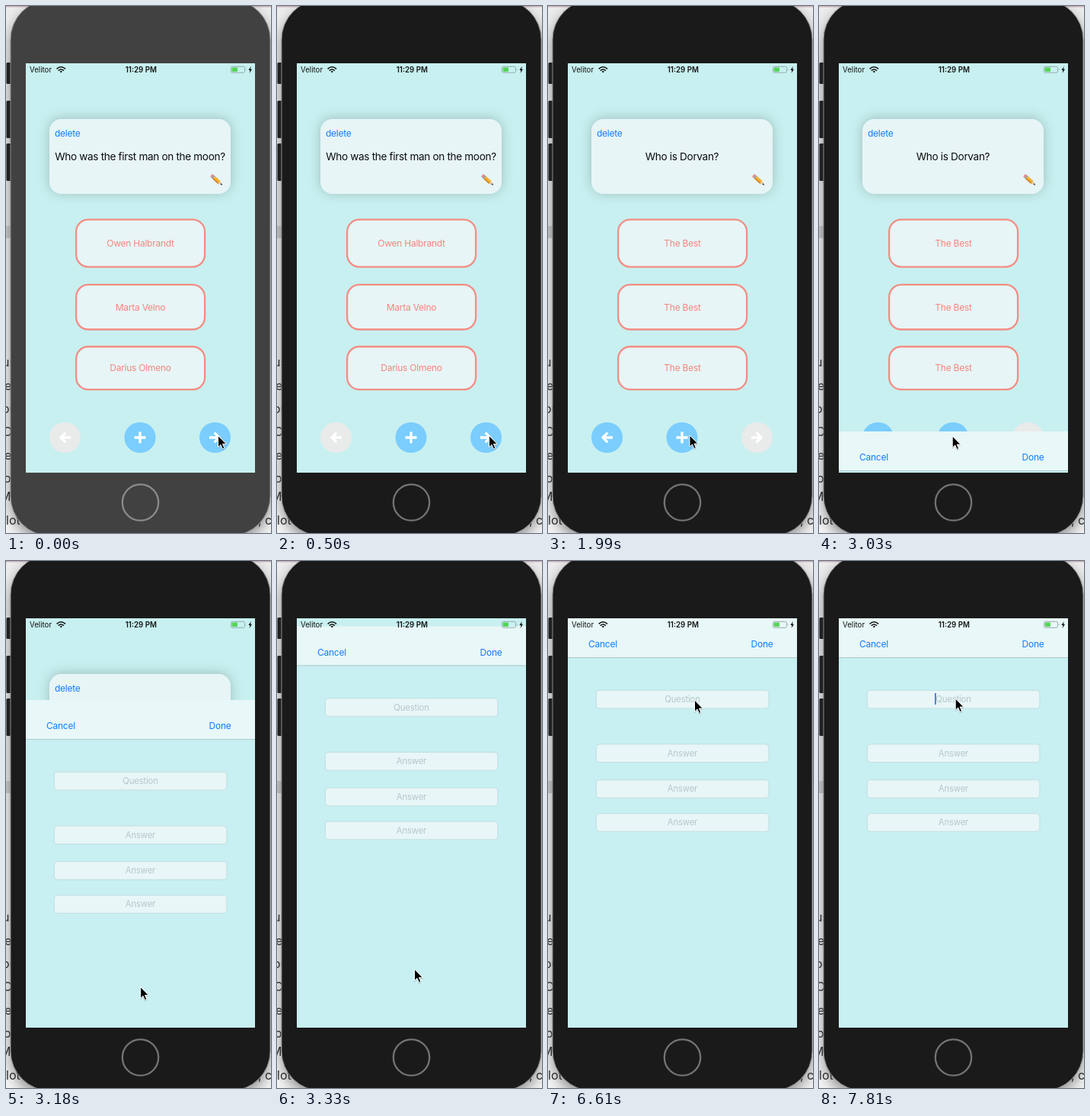
These frames come from a looping animation (348 px wide and 690 px high, 8 s). An HTML page:

```html
<!DOCTYPE html>
<html lang="en">
<head>
<meta charset="utf-8">
<title>Quiz cards</title>
<style>
  html, body { margin: 0; width: 100%; height: 100%; overflow: hidden; background: #ededed; }
  svg { display: block; width: 348px; height: 690px; }
  text { font-family: Inter, "Liberation Sans", sans-serif; letter-spacing: -.02em; font-size: 12px; }
  .mid { text-anchor: middle; }
  .link { fill: #107cff; }
  .answer { fill: #f4867c; }
  .question { font-size: 13.6px; letter-spacing: -.025em; fill: #0c0c0c; }
  .hint { font-size: 11.3px; letter-spacing: -.015em; fill: #b5c7ca; }
  .page { font-size: 16px; letter-spacing: 0; fill: #2b2b2b; }
  .status { font-size: 9.7px; letter-spacing: 0; fill: #111; }
  .glyph { fill: none; stroke: #fff; stroke-width: 3.3; }
</style>
</head>
<body>
<svg viewBox="0 0 348 690">
  <defs>
    <clipPath id="screenClip"><rect x="26" y="75" width="301" height="536"/></clipPath>
    <filter id="cardShadow" x="-20%" y="-40%" width="140%" height="180%">
      <feDropShadow dx="0" dy="-1" stdDeviation="8" flood-color="#001a1a" flood-opacity=".22"/>
    </filter>
    <filter id="phoneShadow" x="-20%" y="-10%" width="140%" height="120%">
      <feGaussianBlur stdDeviation="9"/>
    </filter>
    <filter id="cursorShadow" x="-50%" y="-50%" width="200%" height="200%">
      <feDropShadow dx="0" dy=".8" stdDeviation=".7" flood-opacity=".35"/>
    </filter>
  </defs>

  <rect width="348" height="690" fill="#f4f4f4"/>
  <rect width="348" height="288" fill="#ececec"/>
  <rect width="348" height="1.5" fill="#cbb4b8"/>
  <rect y="288" width="8" height="16" fill="#cfcfcf"/>
  <rect x="6" y="0" width="341" height="701" rx="52" opacity=".42" filter="url(#phoneShadow)"/>
  <g id="pageText"></g>
  <g fill="#202020">
    <rect x=".5" y="74" width="7" height="28" rx="1.5"/>
    <rect x=".5" y="124" width="7" height="49" rx="1.5"/>
    <rect x=".5" y="180" width="7" height="49" rx="1.5"/>
  </g>
  <rect id="body" x="6" y="-8" width="341" height="701.5" rx="52" stroke="#8b8b8b" stroke-width="1"/>
  <circle id="home" cx="176.5" cy="650" r="23.7" fill="none" stroke-width="2.3"/>

  <g clip-path="url(#screenClip)">
    <rect x="26" y="75" width="301" height="536" fill="#c8f0f0"/>
    <g id="card">
      <rect x="57" y="148" width="238" height="98" rx="16" fill="#e7f5f7" filter="url(#cardShadow)"/>
      <text class="link" x="64" y="171">delete</text>
      <text class="question mid" id="question" x="176" y="202"></text>
      <g transform="translate(269.5 221.5) rotate(42)">
        <rect x="0" y="-2.4" width="3" height="4.8" rx="1.3" fill="#e58c91"/>
        <rect x="2.5" y="-2.4" width="2.2" height="4.8" fill="#9a9fa3"/>
        <rect x="4.7" y="-2.4" width="9.3" height="4.8" fill="#f4b334"/>
        <rect x="4.7" y=".9" width="9.3" height="1.5" fill="#cf7f22"/>
        <path d="M14-2.4 19.5 0 14 2.4Z" fill="#e8c9a0"/>
        <path d="M17-1.1 19.8 0 17 1.1Z" fill="#333"/>
      </g>
    </g>
    <g id="answers"></g>
    <g id="buttons"></g>
    <g id="modal">
      <rect x="26" width="301" height="545" fill="#c8eff1"/>
      <rect x="26" width="301" height="51" fill="#e8f7f7"/>
      <rect x="26" y="51" width="301" height="1" fill="#b0c9ca"/>
      <text class="link" x="53" y="38.4">Cancel</text>
      <text class="link" x="295.5" y="38.4" text-anchor="end">Done</text>
      <g id="fields"></g>
      <rect id="caret" x="152" y="98" width="1.7" height="15" fill="#4169f0"/>
    </g>
    <text class="status" x="31" y="86.7">Velitor</text>
    <g fill="none" stroke="#111" stroke-width="1.6">
      <path d="M66.6 82.3Q72.3 77.2 78 82.3M68.7 84.6Q72.3 81.4 75.9 84.6"/>
      <path d="M70.5 85.6Q72.3 84.2 74.1 85.6L72.3 87.6Z" fill="#111" stroke="none"/>
    </g>
    <text class="status mid" x="177.3" y="86.7" font-weight="600">11:29 PM</text>
    <rect x="295.5" y="79.3" width="18" height="8" rx="2" fill="none" stroke="#8fa5a5" stroke-width=".9"/>
    <rect x="296.7" y="80.5" width="7.3" height="5.6" rx=".8" fill="#55d558"/>
    <path d="M314.8 81.8q1.4 1.5 0 3Z" fill="#8fa5a5"/>
    <path d="M321.8 79 318.4 84H320.4L319.6 88 323 82.7H321Z" fill="#111"/>
  </g>

  <path id="cursor" d="M0 0V15.2L3.5 12 5.9 17.5 8.4 16.4 6 11.1H10.8Z" stroke="#fff" stroke-width="1"
        stroke-linejoin="round" filter="url(#cursorShadow)"/>
</svg>

<script>
const LOOP = 8000;
const $ = id => document.getElementById(id);
const set = (id, attrs) => {
  for (const [name, value] of Object.entries(attrs)) $(id).setAttribute(name, value);
};
const move = (id, x, y) => set(id, { transform: `translate(${x} ${y})` });
const show = (id, visible) => set(id, { visibility: visible ? 'visible' : 'hidden' });

// Each track entry is [start time, ...values], held until the next entry.
const at = (track, t) => track.findLast(([start]) => start <= t).slice(1);

const FOCUS = 500, PRESS_NEXT = 1100, NEXT_CARD = 1250;
const PRESS_ADD = 2590, RELEASE_ADD = 2880, OPEN_MODAL = 3030, CARET = 7810;

const cardTrack = [[0, 0], [NEXT_CARD, 220], [1400, 43], [1540, 0]];
const modalTrack = [[0, 611], [OPEN_MODAL, 557], [3180, 182], [3330, 85.5], [3480, 76], [3630, 75]];
const cursorTrack = [
  [0, 278.5, 562.5], [1840, 207.5, 564.5], [1990, 186, 562], [2140, 175.5, 562.5], [2290, 175.2, 563],
  [3180, 176.5, 557.5], [3330, 180.5, 534.3], [3480, 190.5, 382.5], [3630, 194.5, 262.5], [3780, 200, 198],
  [3930, 199.5, 187], [4070, 199.5, 184.3], [4220, 199.3, 183],
  [6610, 192.5, 182], [6760, 179.8, 181], [6910, 179.2, 180]
];
const cards = [
  { question: 'Who was the first man on the moon?', answers: ['Owen Halbrandt', 'Marta Velno', 'Darius Olmeno'] },
  { question: 'Who is Dorvan?', answers: ['The Best', 'The Best', 'The Best'] }
];

$('pageText').innerHTML = [
  ['us', -5, 472], ['e', -2, 503], ['ou', -5, 533], ['C', -4, 563], ['e', -2, 594],
  ['o', -3, 624], ['M', -8, 648], ['lot', 0, 679], [', c', 331, 679]
].map(([text, x, y]) => `<text class="page" x="${x}" y="${y}">${text}</text>`).join('');

$('answers').innerHTML = [[279.6, 62], [364.9, 58.6], [446, 56.2]].map(([y, height], i) => `
  <rect x="92.1" y="${y}" width="169" height="${height}" rx="16" fill="#e7f5f6" stroke="#f48d84" stroke-width="2.3"/>
  <text class="answer mid" id="answer${i}" x="176.5" y="${y + height / 2 + 4.3}"></text>`).join('');

const arrow = 'M7.5 0H-5.5M.8-6.3-5.5 0 .8 6.3';
$('buttons').innerHTML = [
  ['back', 77.5, arrow, 1], ['add', 176, 'M-7.5 0H7.5M0-7.5V7.5', 1], ['next', 274.5, arrow, -1]
].map(([id, x, glyph, flip]) => `
  <g id="${id}" transform="translate(${x} 565) scale(${flip} 1)">
    <ellipse id="${id}Disc" rx="20.5" ry="20"/><path class="glyph" d="${glyph}"/>
  </g>`).join('');

$('fields').innerHTML = [93.9, 164.5, 211.2, 255.2].map((y, i) => `
  <rect x="63.4" y="${y + .4}" width="226.4" height="23.6" rx="4" fill="#e8f6f7" stroke="#bddadd" stroke-width=".8"/>
  <text class="hint mid" x="176.5" y="${y + 16.1}">${i ? 'Answer' : 'Question'}</text>`).join('');

function paintButton(id, enabled, pressed) {
  set(id + 'Disc', { fill: enabled ? '#7acdfd' : '#e9eaea' });
  set(id, { opacity: pressed ? .6 : 1 });
}

function render(t) {
  const focused = t >= FOCUS;
  set('body', { fill: focused ? '#1a1a1a' : '#414141' });
  set('home', { stroke: focused ? '#737373' : '#8b8b8b' });

  const second = t >= NEXT_CARD;
  const card = cards[+second];
  $('question').textContent = card.question;
  card.answers.forEach((text, i) => { $('answer' + i).textContent = text; });
  move('card', at(cardTrack, t)[0], 0);

  paintButton('back', second, false);
  paintButton('add', true, t >= PRESS_ADD && t < RELEASE_ADD);
  paintButton('next', !second, t >= PRESS_NEXT && !second);

  move('modal', 0, at(modalTrack, t)[0]);
  show('modal', t >= OPEN_MODAL);
  show('caret', t >= CARET);
  move('cursor', ...at(cursorTrack, t));
}

const started = performance.now();
function tick() {
  render((performance.now() - started) % LOOP);
  requestAnimationFrame(tick);
}
tick();
</script>
</body>
</html>
```
